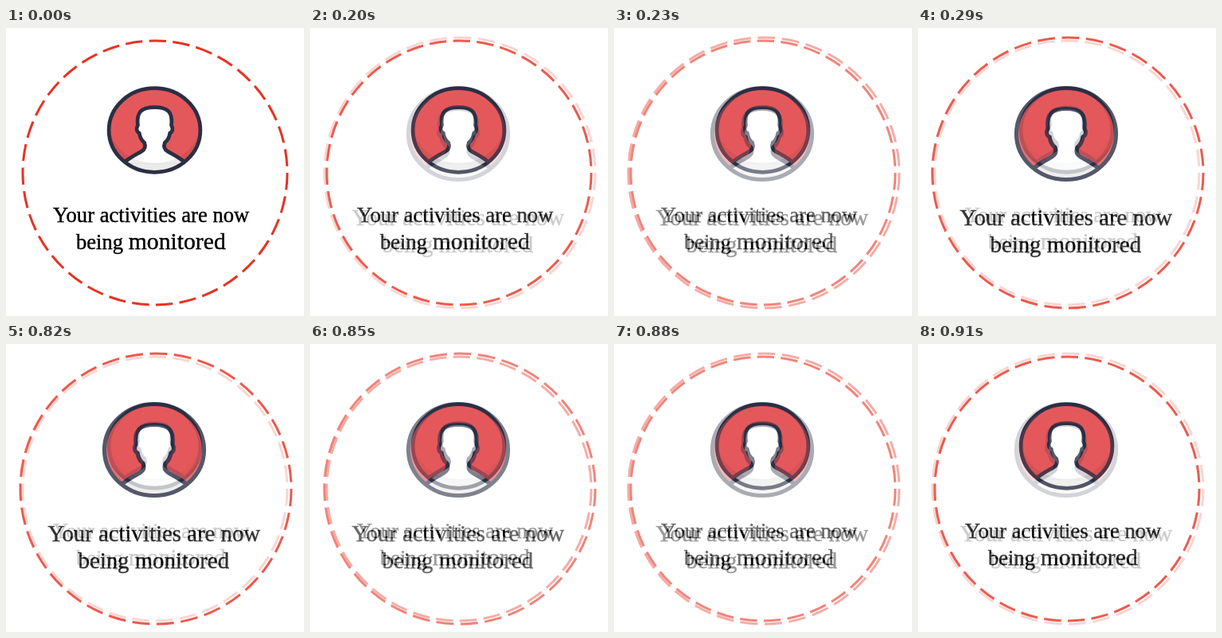
An HTML page for the animation above (0.94 s loop, 374x362 px).

```html
<!DOCTYPE html>
<html lang="en">
<head>
<meta charset="utf-8">
<style>
  html, body { margin: 0; width: 100%; height: 100%; overflow: hidden; background: #fff; }
  svg { display: block; }
  text { font-family: "Liberation Serif", "Times New Roman", serif; stroke: #000; stroke-width: .4; }
  .ring { fill: none; stroke: #e63323; stroke-width: 3; stroke-dasharray: 7.2 2.8; }
  .line { fill: none; stroke: #2b2f44; stroke-width: 5.2; }
</style>
</head>
<body>
<svg width="374" height="362" viewBox="0 0 374 362">
  <defs>
    <clipPath id="disc"><ellipse rx="62.5" ry="57.5"/></clipPath>
    <path id="person" d="M-44 46C-34 37 -25 33 -18 29Q-11 25 -14 17C-18 14 -20 10 -21 4C-25 2 -25 -3 -23 -7C-25 -25 -18 -31.5 0 -31.5S25 -25 23 -7C25 -3 25 2 21 4C20 10 18 14 14 17Q11 25 18 29C25 33 34 37 44 46"/>
    <g id="avatar">
      <ellipse rx="62.5" ry="57.5" fill="#e4585b"/>
      <g clip-path="url(#disc)">
        <use href="#person" fill="#fff"/>
        <path fill="#fff" d="M-44 45.5H44V70H-44Z"/>
        <path fill-opacity=".08" d="M-63 -12A63 57 0 0 0 63 -12V70H-63Z"/>
        <use href="#person" class="line"/>
      </g>
      <ellipse class="line" rx="62.5" ry="57.5"/>
    </g>
  </defs>

  <g>
    <circle class="ring" cx="187" cy="182" r="166" pathLength="350"/>
    <use href="#avatar" transform="translate(186.5 128.5) scale(.918)"/>
    <text x="59" y="244" font-size="26.6">Your activities are now</text>
    <text x="88" y="278" font-size="26.6">being <tspan font-size="29.7">monitored</tspan></text>
  </g>

  <g id="large">
    <rect width="374" height="362" fill="#fff"/>
    <circle class="ring" cx="188" cy="182" r="170" pathLength="350"/>
    <use href="#avatar" transform="translate(186 133)"/>
    <text x="52.5" y="248" font-size="28.8">Your activities are now</text>
    <text x="90.5" y="282" font-size="28.8">being monitored</text>
  </g>
</svg>
<script>
  const LOOP = 940, STEP = 30;
  const large = document.getElementById("large");

  // Five-step cross-fade in from 200 ms, and back out from 820 ms.
  function mix(t) {
    if (t < 200) return 0;
    if (t < 820) return Math.min(5, Math.floor((t - 200) / STEP) + 1) / 5;
    return (4 - Math.floor((t - 820) / STEP)) / 5;
  }

  function draw() {
    large.style.opacity = mix(performance.now() % LOOP);
    requestAnimationFrame(draw);
  }
  draw();
</script>
</body>
</html>
```
